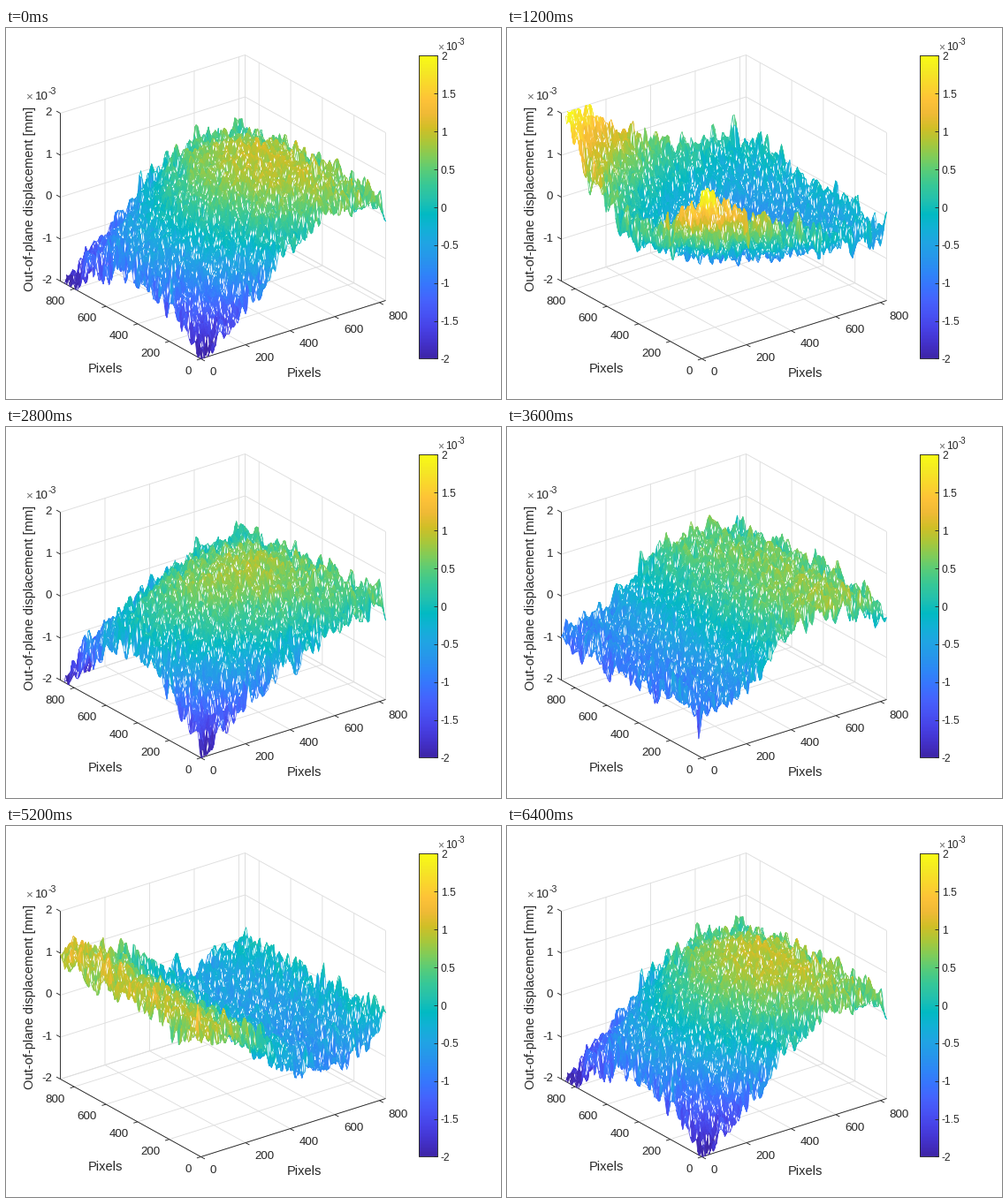
Recreate the animation shown at these times as a matplotlib script. Size 560 by 420 pixels, loop 6.8 s.

```python
import numpy as np
import matplotlib.pyplot as plt
from matplotlib.animation import FuncAnimation
from matplotlib.collections import LineCollection, PolyCollection
from matplotlib.colors import LinearSegmentedColormap

W, H, DPI = 560, 420, 100
FRAMES, STEP_MS, PHASES = 17, 400, 8
INK, GRID = "#262626", "#dedede"
XMAX, YMAX = 828, 888
NX, NY = 125, 133
GAPS = 0.3  # share of cells whose white face shows through the mesh

plt.rcParams["font.family"] = "Liberation Sans"
PARULA = LinearSegmentedColormap.from_list("parula", (
    "#3e26a8 #4332cb #4741e5 #4852f4 #4563fd #3875fe #2e87f7 #2797eb "
    "#20a5e3 #12b1d6 #02bac3 #24c1ae #37c897 #57cc7a #81cc59 #abc739 "
    "#d1bf27 #f0ba36 #fec338 #fad62d #f5e924 #f9fb15").split(), N=256)


def px(n):
    return n * 72 / DPI


def project(u, v, z):
    """Orthographic view of the unit floor (u, v) and height z in [-2, 2]."""
    return np.stack(np.broadcast_arrays(
        221 + 209 * u - 159 * v,
        374 - 66 * u - 88 * v - 47.5 * (z + 2)), axis=-1)


fig = plt.figure(figsize=(W / DPI, H / DPI), dpi=DPI, facecolor="white")
ax = fig.add_axes([0, 0, 1, 1])
ax.axis("off")


def label(x, y, s, size=13.33, ha="center", color=INK):
    """Place text with its digits centred on y."""
    ax.text(x, y + 0.36 * size, s, fontsize=px(size), color=color, ha=ha,
            va="baseline")


def exponent(x, y, size):
    label(x, y, "×", size, "left", "#6a6a6a")
    label(x + 0.79 * size, y, "10", size, "left")
    label(x + 1.9 * size, y - 5.5, "-3", 0.8 * size, "left")


def lines(segs, color, width, z):
    ax.add_collection(LineCollection(segs, colors=color, linewidths=px(width),
                                     zorder=z, capstyle="butt"))


def draw_box():
    grid, ticks = [], []
    for t in [200 * k / XMAX for k in range(5)] + [1]:
        grid.append(project(t, np.array([0, 1, 1]), np.array([-2, -2, 2])))
    for t in [200 * k / YMAX for k in range(5)] + [1]:
        grid.append(project(np.array([0, 1, 1]), t, np.array([-2, -2, 2])))
    for z in range(-2, 3):
        grid.append(project(np.array([0, 1, 1]), np.array([1, 1, 0]), z))
    lines(grid, GRID, 0.9, 1)

    for k in range(5):
        x, y = project(200 * k / XMAX, 0, -2)
        ticks.append([(x, y), (x + 4.4, y + 2.4)])
        label(x + 10, y + 14, str(200 * k), ha="left")
        x, y = project(0, 200 * k / YMAX, -2)
        ticks.append([(x, y), (x - 4.6, y + 1.4)])
        label(x - 10.5, y + 12.5, str(200 * k), ha="right")
    for z in range(-2, 3):
        x, y = project(0, 1, z)
        ticks.append([(x, y), (x - 4.4, y - 2.4)])
        label(x - 9.5, y - 2, str(z), ha="right")
    edges = [project(np.array([0, 0, 0, 1]), np.array([1, 1, 0, 0]),
                     np.array([2, -2, -2, -2]))]
    lines(edges + ticks, INK, 0.9, 2)

    label(113, 384.5, "Pixels", 14.67)
    label(338, 389.5, "Pixels", 14.67)
    ax.text(27.5, 192.5, "Out-of-plane displacement [mm]", rotation=90,
            fontsize=px(14.67), color=INK, ha="center", va="center")
    exponent(22.5, 76, 13.33)


def draw_colorbar():
    x0, x1, y0, y1 = 467, 488, 31, 374
    ax.imshow(np.linspace(1, 0, 256)[:, None], cmap=PARULA, aspect="auto",
              extent=(x0, x1, y1, y0), zorder=2)
    segs = [[(x0, y0), (x1, y0), (x1, y1), (x0, y1), (x0, y0)]]
    for k in range(9):
        y = y1 - (y1 - y0) * k / 8
        segs.append([(x1 - 4, y), (x1, y)])
        label(492.5, y + 0.3, f"{-2 + k / 2:g}", 12, ha="left")
    lines(segs, INK, 0.9, 3)
    exponent(488.5, 20.5, 12)


# Far corner first, so nearer cells paint over farther ones.
U, V = np.meshgrid(np.linspace(1, 0, NX), np.linspace(1, 0, NY), indexing="ij")
ARCH = 4 * V * (1 - V)
RIM = np.maximum(abs(2 * U - 1), abs(2 * V - 1)) ** 6
rng = np.random.default_rng(7)


def grain():
    """Softened white noise, rougher towards the rim."""
    kernel = np.exp(-np.arange(-2, 3) ** 2 / 2)
    n = rng.standard_normal((NX + 4, NY + 4))
    n = sum(w * n[i:i + NX] for i, w in enumerate(kernel))
    n = sum(w * n[:, i:i + NY] for i, w in enumerate(kernel))
    return 0.13 * (1 + 0.6 * RIM) * n / n.std()


ROLL = (-0.11 - 0.81 * np.cos(np.pi * U / 0.7) + 0.1 * U * ARCH
        - 0.3 * V * np.sin(np.pi * U ** 2) + grain())
BOWL = (2.3 * (1 - U) ** 1.8 - 0.33 * (1 - V)
        - 1.87 * ARCH * (1 - U ** 1.6) + grain())
OPEN = rng.random((NX - 1) * (NY - 1)) < GAPS


def height(k):
    """Harmonic motion: ROLL peaks at phase 1, BOWL a quarter turn later."""
    a = 2 * np.pi * (k - 1) / PHASES
    return ROLL * np.cos(a) + BOWL * np.sin(a)


def corners(a):
    return np.stack([a[:-1, :-1], a[1:, :-1], a[1:, 1:], a[:-1, 1:]],
                    axis=2).reshape(-1, 4, *a.shape[2:])


mesh = PolyCollection([], linewidths=px(0.7), zorder=4)


def update(i):
    z = height(i % PHASES)
    cells = corners(z)
    keep = np.abs(cells.mean(axis=1)) < 2
    colors = PARULA((cells[keep, 2] + 2) / 4)
    mesh.set_verts(corners(project(U, V, np.clip(z, -2, 2)))[keep])
    mesh.set_edgecolor(colors)
    mesh.set_facecolor(np.where(OPEN[keep, None], 1.0, colors))
    return mesh,


draw_box()
draw_colorbar()
ax.add_collection(mesh)
ax.set_xlim(0.5, W + 0.5)
ax.set_ylim(H - 0.5, -0.5)

anim = FuncAnimation(fig, update, frames=FRAMES, interval=STEP_MS,
                     init_func=lambda: update(0), repeat=True,
                     repeat_delay=0, blit=False)
plt.show()
```
